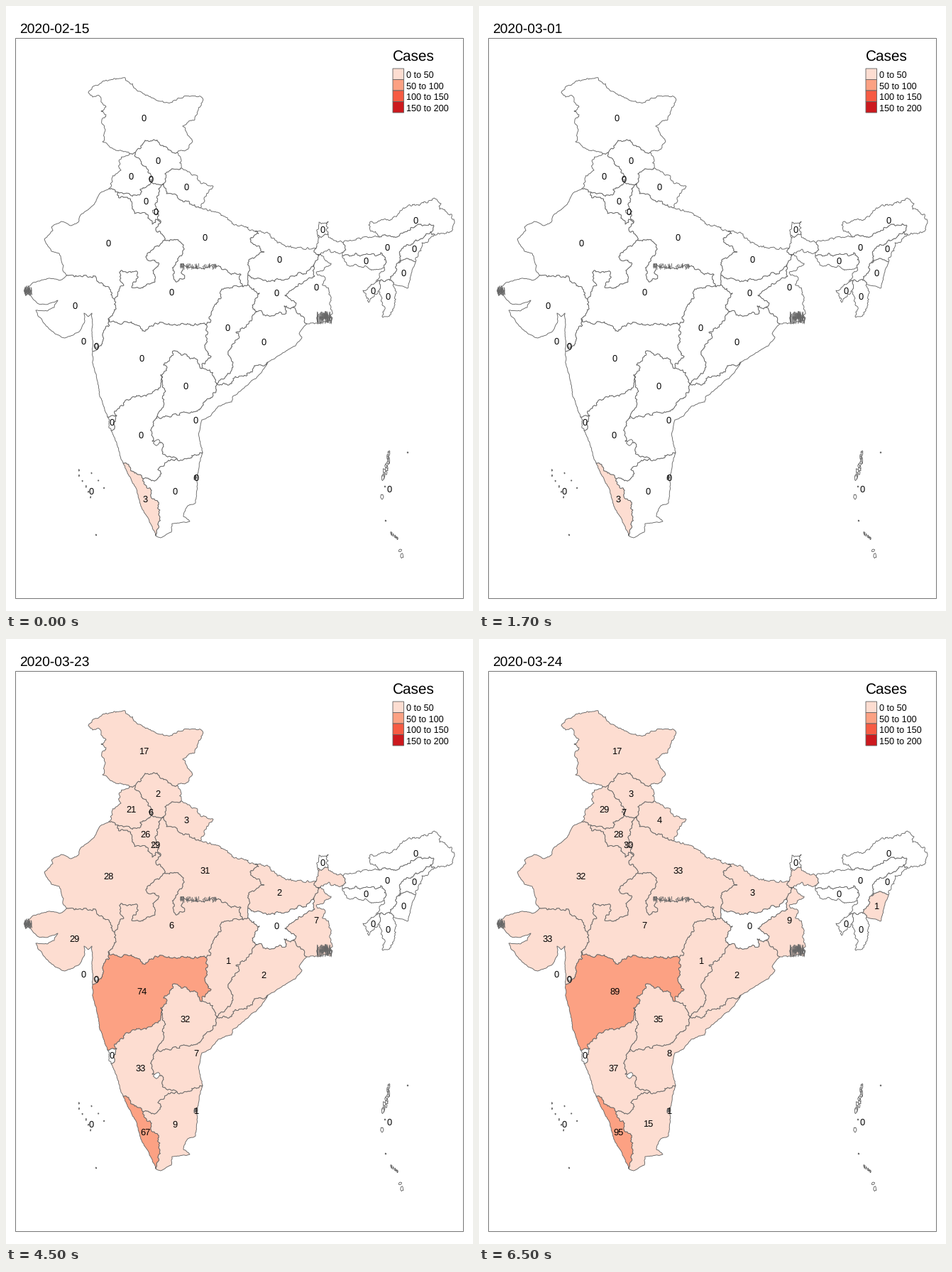
These frames come from a looping animation (658 by 851 pixels, 8 s). A matplotlib script:

```python
import math
import random

import matplotlib.pyplot as plt
from matplotlib.animation import FuncAnimation
from matplotlib.collections import LineCollection
from matplotlib.patches import Polygon, Rectangle

W, H, DPI = 658, 851, 64
PX = 72 / DPI  # points per pixel
GREY = "#666666"
SHADES = ["#FDDDD1", "#FCA183", "#F75B43", "#CC191E"]
plt.rcParams.update({"font.family": "Liberation Sans", "text.hinting": "no_hinting"})

fig = plt.figure(figsize=(W / DPI, H / DPI), dpi=DPI, facecolor="white")
ax = fig.add_axes([0, 0, 1, 1])
ax.set_xlim(0, W)
ax.set_ylim(H, 0)
ax.axis("off")

RUGGED, COAST = 0.33, 0.12
borders = {}


def roughen(a, b, k, rng):
    """Midpoint displacement; returns the points after a, up to b."""
    dx, dy = b[0] - a[0], b[1] - a[1]
    length = math.hypot(dx, dy)
    if length < 2.4:
        return [b]
    d = k * rng.uniform(-1, 1) * min(1, 7 / length)
    mid = ((a[0] + b[0]) / 2 - dy * d, (a[1] + b[1]) / 2 + dx * d)
    return roughen(a, mid, k, rng) + roughen(mid, b, k, rng)


def border(name, *points, k=RUGGED):
    rng = random.Random(name)
    line = [points[0]]
    for a, b in zip(points, points[1:]):
        line += roughen(a, b, k, rng)
    borders[name] = line


def outline(code):
    """Chain every border that carries the code into one ring."""
    parts = [line for name, line in borders.items() if code in name.split("-")]
    ring = parts.pop(0)[:]
    while parts:
        i = next(i for i, p in enumerate(parts) if ring[-1] in (p[0], p[-1]))
        part = parts.pop(i)
        ring += part[1:] if part[0] == ring[-1] else part[-2::-1]
    return ring


def centroid(ring):
    area = cx = cy = 0
    for (x0, y0), (x1, y1) in zip(ring, ring[1:] + ring[:1]):
        cross = x0 * y1 - x1 * y0
        area += cross
        cx += (x0 + x1) * cross
        cy += (y0 + y1) * cross
    return cx / (3 * area), cy / (3 * area)


def shape(points, zorder=2):
    return ax.add_patch(Polygon(points, closed=True, fc="white", ec=GREY,
                                lw=0.9 * PX, joinstyle="round", zorder=zorder))


def blob(x, y, rx, ry):
    rng = random.Random(f"{x},{y}")
    ring = []
    for i in range(11):
        a, r = i * math.tau / 11, rng.uniform(0.6, 1.2)
        ring.append((x + rx * r * math.cos(a), y + ry * r * math.sin(a)))
    return shape(ring, 3)


def island_chain(start, end, count, spread, size):
    rng = random.Random(count)
    for i in range(count):
        t = i / (count - 1)
        x = start[0] + (end[0] - start[0]) * t + rng.uniform(-spread, spread)
        y = start[1] + (end[1] - start[1]) * t
        blob(x, y, rng.uniform(0.4, 1) * size, rng.uniform(0.8, 2) * size)


def tangle(x0, x1, y0, y1, count):
    rng = random.Random(x0)
    middle = (y0 + y1) / 2
    lines = []
    for _ in range(count):
        x = rng.uniform(x0, x1)
        lines.append([(x, rng.uniform(y0, middle)), (x + rng.uniform(-2, 2), middle),
                      (x + rng.uniform(-1, 1), rng.uniform(middle, y1))])
    ax.add_collection(LineCollection(lines, colors=GREY, linewidths=0.9 * PX, zorder=4))


def box(x, y, w, h, **kw):
    ax.add_patch(Rectangle((x, y), w, h, ec=GREY, lw=0.9 * PX, snap=False, **kw))


def write(x, y, text, size, **kw):
    return ax.text(x, y, text, fontsize=size * PX, color="black", va="baseline", zorder=6, **kw)


# North: a border belongs to every region code in its name
border("JK-outer", (174, 208), (151, 201), (136, 191), (140, 174), (135, 160), (141, 153),
       (134, 148), (141, 142), (134, 133), (131, 126), (122, 128), (116, 122), (125, 112),
       (147, 104), (168, 101), (187, 120), (213, 133), (228, 136), (250, 128), (274, 127),
       (277, 134), (266, 160), (249, 169), (254, 177), (262, 192), (258, 199), (241, 206), k=0.25)
border("HP-JK", (182, 206), (196, 189), (208, 188), (222, 198), (241, 206))
border("HP-east", (241, 206), (246, 213), (247, 228))
border("HP-PB", (182, 206), (182, 212), (194, 225), (204, 247))
border("HP-HR", (204, 247), (212, 251), (222, 250))
border("HP-UK", (222, 250), (224, 236), (230, 232), (247, 228))
border("PB-JK", (182, 206), (174, 208))
border("PB-west", (174, 208), (160, 216), (162, 231), (149, 243), (145, 257))
border("PB-RJ", (145, 257), (158, 262))
border("PB-HR", (158, 262), (188, 266), (189, 258), (204, 247))
border("HR-RJ", (158, 262), (159, 270), (172, 271), (181, 292), (197, 293), (206, 307),
       (211, 300), (218, 305))
border("HR-UP", (222, 250), (215, 257), (211, 277), (218, 305))
border("UK-east", (247, 228), (270, 241), (273, 246), (292, 254), (279, 270), (274, 284))
border("UK-UP", (274, 284), (262, 280), (242, 270), (226, 264), (222, 250))
border("UP-north", (274, 284), (300, 291), (315, 302), (333, 309), (351, 317))
border("UP-RJ", (218, 305), (213, 318), (226, 330))
border("UP-BR", (351, 317), (356, 320), (345, 330), (364, 346), (341, 361), (341, 379))
border("UP-JH", (340, 393), (341, 379))
border("UP-CG", (334, 395), (340, 393))
border("UP-MP", (226, 330), (244, 331), (250, 336), (249, 348), (235, 372), (239, 388),
       (250, 384), (246, 363), (270, 370), (292, 364), (331, 378), (334, 395))

# West
border("RJ-west", (145, 257), (134, 262), (122, 281), (105, 294), (102, 304), (92, 309),
       (78, 303), (64, 311), (66, 316), (54, 328), (64, 345), (75, 348), (81, 365),
       (80, 372), (86, 379), k=COAST)
border("RJ-GJ", (86, 379), (126, 380), (130, 388), (149, 403), (153, 413))
border("RJ-MP", (226, 330), (199, 349), (199, 357), (215, 361), (207, 372), (210, 388),
       (190, 397), (177, 396), (183, 388), (185, 374), (162, 372), (166, 393), (153, 413))
border("GJ-coast", (86, 379), (75, 386), (62, 383), (38, 389), (30, 396), (36, 409), (46, 419),
       (60, 419), (73, 414), (68, 424), (58, 429), (42, 428), (46, 437), (64, 457), (83, 467),
       (102, 459), (111, 443), (110, 432), (116, 437), (121, 432), (121, 455), (122, 486), k=COAST)
border("GJ-MP", (153, 413), (155, 426), (144, 440))
border("GJ-MH", (144, 440), (146, 449), (136, 463), (137, 469), (122, 486))
border("MH-MP", (144, 440), (156, 445), (188, 450), (192, 457), (210, 446), (262, 449), (281, 448))
border("MH-CG", (281, 448), (284, 461), (280, 480), (289, 493), (276, 504), (275, 510))
border("MH-TG", (275, 510), (270, 498), (237, 485), (222, 505), (227, 509), (218, 519))
border("MH-KA", (218, 519), (217, 537), (190, 550), (178, 550), (153, 570), (156, 576))
border("MH-coast", (122, 486), (122, 500), (131, 541), (143, 578), k=COAST)
border("MH-GA", (143, 578), (156, 576))
border("GA-KA", (156, 576), (153, 593), (148, 597))
border("GA-coast", (143, 578), (148, 597))

# Centre and east
border("MP-CG", (334, 395), (304, 398), (303, 411), (291, 428), (288, 445), (281, 448))
border("CG-JH", (340, 393), (357, 404), (347, 424), (354, 430))
border("CG-OD", (354, 430), (342, 447), (324, 459), (327, 468), (313, 486), (320, 501),
       (316, 517), (297, 531))
border("CG-TG", (275, 510), (287, 512), (297, 531))
border("OD-JH", (404, 424), (392, 422), (395, 432), (366, 436), (354, 430))
border("OD-WB", (404, 424), (417, 436), (424, 447))
border("OD-coast", (369, 501), (408, 478), (417, 466), (413, 461), (424, 447), k=COAST)
border("JH-WB", (404, 424), (409, 418), (393, 407), (403, 399), (435, 380), (434, 364))
border("BR-JH", (341, 379), (362, 386), (405, 380), (412, 375), (421, 377), (434, 364))
border("BR-north", (351, 317), (370, 320), (382, 333), (420, 342), (438, 338))
border("BR-WB", (438, 338), (434, 346), (441, 351), (434, 364))
border("WB-nepal", (438, 338), (439, 322))
border("WB-SK", (439, 322), (446, 324), (454, 321))
border("SK-north", (439, 322), (441, 304), (454, 303), (454, 321))
border("WB-bhutan", (454, 321), (456, 326), (475, 333))
border("WB-AS", (475, 333), (476, 346))
border("WB-delta", (476, 346), (459, 347), (455, 342), (439, 350), (458, 362), (437, 375),
       (450, 383), (446, 393), (455, 400), (458, 445), (438, 446), (424, 447))

# South
border("KA-TG", (218, 519), (222, 545), (222, 562), (213, 577))
border("AP-TG", (213, 577), (268, 570), (282, 555), (296, 543), (297, 531))
border("AP-KA", (213, 577), (205, 595), (206, 612), (222, 617), (220, 626), (241, 637))
border("AP-OD", (369, 501), (350, 506), (347, 515), (320, 524), (316, 531), (297, 531))
border("AP-coast", (277, 628), (272, 606), (276, 582), (288, 577), (299, 563), (318, 557),
       (319, 550), (353, 523), (369, 501), k=COAST)
border("AP-TN", (241, 637), (255, 637), (277, 628))
border("KA-TN", (193, 665), (213, 666), (219, 658), (214, 652), (226, 642), (241, 637))
border("KA-KL", (165, 643), (180, 655), (193, 665))
border("KA-coast", (148, 597), (159, 626), (165, 643), k=COAST)
border("KL-coast", (165, 643), (184, 680), (192, 708), (211, 745), k=COAST)
border("KL-TN", (193, 665), (205, 681), (204, 690), (214, 702), (215, 731), (211, 745))
border("TN-coast", (211, 745), (218, 748), (233, 740), (234, 728), (259, 725), (250, 718),
       (256, 703), (267, 699), (269, 668), (277, 628), k=COAST)

# North-east
border("AS-bhutan", (475, 333), (495, 327), (526, 325))
border("AS-AR", (526, 325), (545, 324), (579, 308), (602, 308), (598, 318))
border("AR-outer", (526, 325), (511, 308), (536, 301), (555, 288), (588, 277), (607, 272),
       (613, 278), (611, 286), (628, 293), (632, 303), (624, 319), (604, 322))
border("AR-NL", (598, 318), (604, 322))
border("AS-NL", (598, 318), (561, 338), (553, 361))
border("NL-east", (604, 322), (586, 333), (577, 360))
border("NL-MN", (553, 361), (560, 357), (577, 360))
border("AS-MN", (553, 361), (546, 377), (541, 386))
border("MN-east", (577, 360), (566, 397), (546, 391), k=COAST)
border("MN-MZ", (541, 386), (546, 391))
border("AS-MZ", (541, 386), (527, 386))
border("MZ-outer", (546, 391), (548, 420), (538, 437), (531, 438), (526, 399))
border("TR-MZ", (527, 386), (526, 399))
border("AS-TR", (527, 386), (522, 388))
border("TR-outer", (522, 388), (503, 400), (511, 417), (526, 399))
border("AS-sylhet", (522, 388), (526, 378), (533, 368))
border("AS-ML", (533, 368), (536, 360), (528, 347), (492, 348), (474, 351))
border("ML-south", (533, 368), (520, 371), (480, 364), (474, 351))
border("AS-west", (474, 351), (476, 346))

rings = {}
for name in borders:
    for code in name.split("-"):
        if code.isupper() and code not in rings:
            rings[code] = outline(code)
regions = {code: shape(ring) for code, ring in rings.items()}
places = {code: centroid(ring) for code, ring in rings.items()}

# Small territories and islands
places.update(DL=(211, 289), CH=(204, 243), DN=(127.5, 478), DD=(109.5, 471),
              PY=(268, 663), LD=(120.5, 682), AN=(540, 679))
for code, size in dict(DL=4.5, CH=2.5, DN=3).items():
    regions[code] = blob(*places[code], size, size)
blob(212.5, 613.5, 5, 4.5)
island_chain((540, 628), (533, 664), 16, 2, 2.2)
island_chain((542, 741), (551, 749), 6, 1.5, 1.2)
island_chain((555, 766), (558, 773), 2, 0.3, 2.3)
blob(530, 690, 2, 3.5)
for x, y in [(534, 676), (535, 724), (566, 628), (127, 744)]:
    blob(x, y, 0.9, 0.9)
island_chain((101, 653), (118, 691), 6, 3, 0.8)
island_chain((121, 657), (139, 678), 3, 1, 0.8)

# Creeks and ravines too fine to resolve
tangle(438, 459, 429, 448, 60)
tangle(26.5, 36, 393, 408, 30)
tangle(244, 298, 362, 371, 40)
tangle(264.5, 267.5, 659, 667, 9)

box(13.5, 45.5, 631, 788, fill=False)
write(544.5, 76.5, "Cases", 20.8)
for i, shade in enumerate(SHADES):
    y = 88 + 15.5 * i
    box(545, y, 15.5, 15.5, fc=shade)
    write(564.5, y + 13, f"{50 * i} to {50 * (i + 1)}", 12.6)

date = write(19.5, 38, "", 19.2)
labels = {code: write(x, y + 4.5, "", 12.9, ha="center") for code, (x, y) in places.items()}

# Start time in ms, date, and the counts that changed since the last report
reports = [
    (0, "2020-02-15", dict(KL=3)),
    (500, "2020-03-01", {}),
    (2500, "2020-03-15", dict(JK=5, PB=1, UK=1, HR=14, DL=7, RJ=4, UP=13, MH=32, TG=3, AP=1,
                              KA=6, KL=22, TN=1)),
    (4500, "2020-03-23", dict(JK=17, HP=2, PB=21, CH=6, UK=3, HR=26, DL=29, RJ=28, UP=31, BR=2,
                              GJ=29, MP=6, WB=7, CG=1, OD=2, MH=74, TG=32, AP=7, KA=33, KL=67,
                              TN=9, PY=1)),
    (6500, "2020-03-24", dict(HP=3, PB=29, CH=7, UK=4, HR=28, DL=30, RJ=32, UP=33, BR=3, GJ=33,
                              MP=7, WB=9, MH=89, TG=35, AP=8, KA=37, KL=95, TN=15, MN=1)),
]
STEP = 500


def update(frame):
    cases = {}
    for start, day, changes in reports:
        if start <= frame * STEP:
            cases.update(changes)
            date.set_text(day)
    for code, label in labels.items():
        n = cases.get(code, 0)
        label.set_text(str(n))
        if code in regions:
            regions[code].set_facecolor(SHADES[(n - 1) // 50] if n else "white")
    return []


anim = FuncAnimation(fig, update, frames=16, interval=STEP, repeat=True, repeat_delay=0, blit=False)
plt.show()
```
